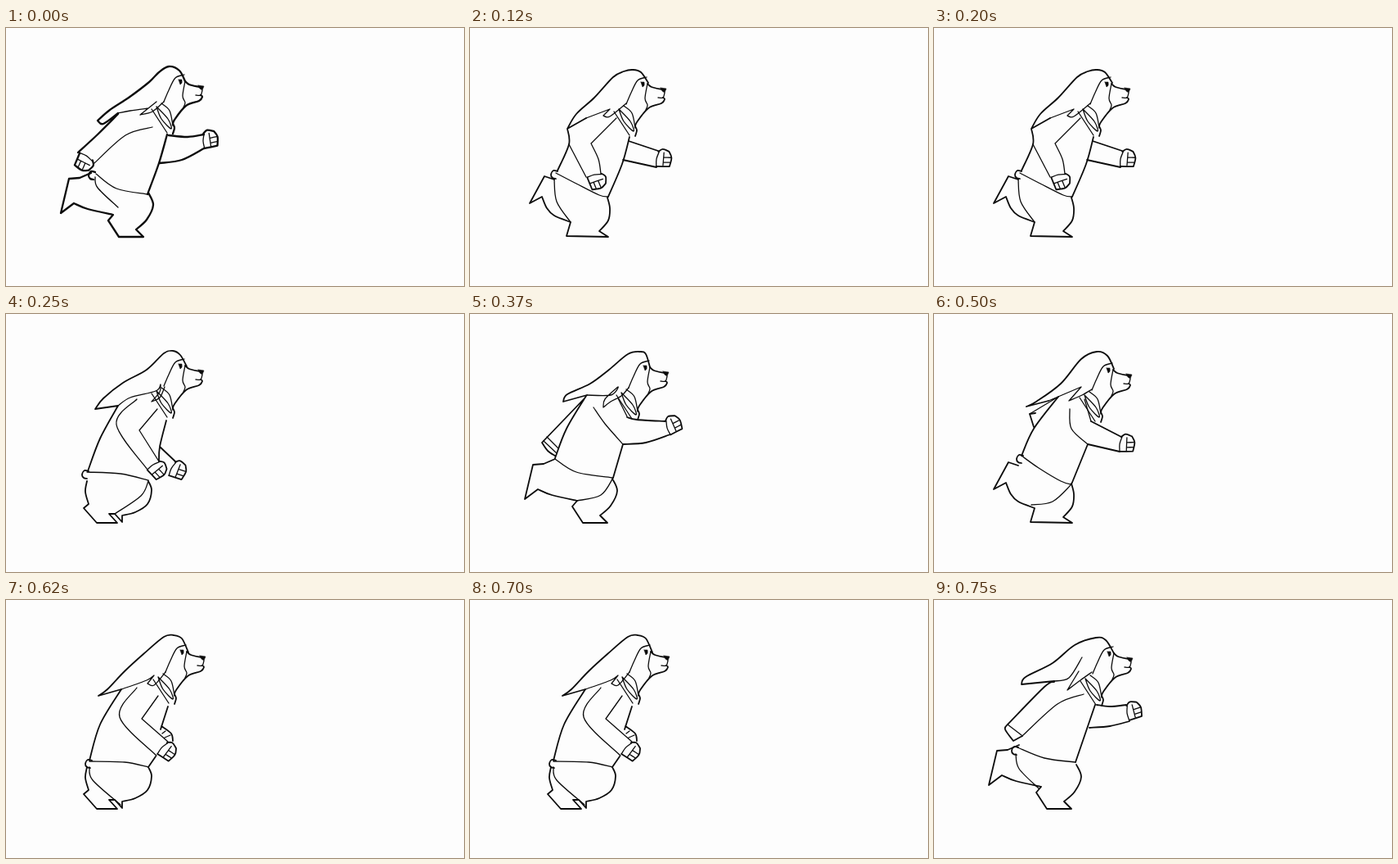
Recreate the animation shown at these times as an HTML page. Size 560 px wide and 315 px high, loop 0.87 s.

```html
<!DOCTYPE html>
<html lang="en">
<head>
<meta charset="utf-8">
<title>Running bear</title>
<style>
  html, body { margin: 0; width: 100%; height: 100%; overflow: hidden; background: #fdfdfd; }
  svg { display: block; width: 560px; height: 315px; }
  path { fill: none; stroke: #0c0c0c; stroke-linecap: round; stroke-linejoin: round; }
  .bold { stroke-width: 1.8; }
  .heavy .bold { stroke-width: 2.3; }
  .thin { stroke-width: 1.3; }
  .ink { fill: #0c0c0c; stroke-width: .6; }
</style>
</head>
<body>
<svg id="stage" viewBox="0 0 560 315"></svg>
<script>
// Strokes are separated by "/". Points are joined by a smooth curve; "!" marks a sharp corner.
const HEAD = {
  bold: '219,65 224,69 236,72 / 238,82! 240,84 236,89 220,95 206,112 204,118 / 204,117 206,122 204,129',
  thin: '240,76 238,82 232,82 / 219,65 216,83 219,91 217,97 / 218,57 207,61 199,76 193,90 / 190,92 200,101 204,119 / 184,96 198,111 202,123 190,111 184,96 / 178,99 197,128',
  ink: '235,70! 242,71! 240,76! 237,74! 235,70! / 211,63! 215,63! 215,67 213,69! 211,63!'
};

// Drawn pointing right, with the middle of the cuff at the origin.
const FIST = {
  bold: '0,-9! 5,-13 13,-11! 17,-4 16,7! 0,9',
  thin: '1,-9 -1,0 0,9 / 7,-9 8,7 / 8,-3 16,-4 / 8,3 16,2'
};

const TAIL = { bold: '4,-4 -1,-5 -4,0 -2,4 2,5' };

// The legs repeat every three steps: reach, land, gather.
const LEGS = [
  '104,177 90,183! 77,184! 67,226! 83,214! 100,221 131,228! 125,235! 138,255! 168,255! 159,246! 172,234 180,216 174,201',
  '103,185! 91,181! 73,214! 88,206! 94,220 103,229 123,237! 118,254! 169,255! 158,248! 169,235 171,220 168,207',
  '99,204 97,217 101,232! 95,237! 111,255! 136,255! 126,244! 133,244! 142,254! 142,246! 158,242 173,232 178,215 174,204'
];

const POSES = [
  { head: [0, 0], tail: [105, 180], fists: [[242, 138, -5], [98, 157, 120]],
    bold: '219,65 212,52 199,47 187,54 175,66 150,85 127,100 112,113! 119,117 137,104 / 137,105 112,130 88,152 / 197,130 187,165 173,203 / 199,131 222,133 242,130 / 188,165 215,161 242,147',
    thin: '137,104 152,101 174,98 / 184,90 164,106! 179,102 193,90 / 179,121 146,131 107,166 / 110,178 135,196 173,203 / 109,182 112,195 137,219' },
  { head: [-2, 3], tail: [103, 179], fists: [[229, 160, 8], [152, 180, 75]],
    bold: '218,67 209,54 199,51 188,53 175,60 152,85 130,105 119,123! 142,110 / 119,123 121,142 107,174 / 195,133 186,166 169,206 / 194,138 230,150 / 187,161 228,170',
    thin: '142,110 171,99! 163,107! 171,108 191,92 / 121,142 142,182 / 179,110 148,141! 157,160 160,178 / 105,177 130,190 158,204 169,206 / 103,185 106,212 123,237' },
  { head: [0, -2], tail: [97, 196], fists: [[203, 189, 25], [180, 185, 54]],
    bold: '221,64 213,50 204,45 193,48 172,68 143,84 119,103 109,116! 137,112 / 137,112 115,152 100,192 / 196,130 188,162 187,180 / 188,162 207,180',
    thin: '137,112 152,102 183,94 189,86! 188,95 178,107! 188,102 194,89 / 160,104 135,135 173,190 / 185,116 163,142! 187,180 / 99,193 140,195 174,203 / 174,204 165,222 133,244' },
  { head: [1, 0], fists: [[242, 139, -20]],
    bold: '220,65 215,49 208,46 193,49 170,68 147,85 119,98 114,107! 143,99 / 140,103 88,157! 95,167 104,173 / 142,100 118,140 104,176 / 187,159 175,200 / 192,126 204,129 239,131 / 187,159 215,157 245,147',
    thin: '143,99 172,99 181,89 165,104 163,114! 172,107 185,100 194,90 / 94,150 108,164 / 90,155 106,170 / 151,114 165,134 187,159 / 181,103 192,125 / 104,177 130,193 175,200 / 131,228 160,221 175,200' },
  { head: [0, 3], tail: [105, 177], fists: [[228, 159, 6]],
    bold: '220,67 212,51 199,46 180,55 155,85 125,107 113,113! 140,106 / 124,121 117,122! 122,138 / 152,101 122,140 107,173 / 188,159 168,208 / 192,131 229,150 / 188,159 227,168',
    thin: '140,106 180,89! 165,106! 181,99 193,92 / 117,122 152,101 / 166,116 168,140 188,159 / 184,104 192,131 / 107,173 128,188 155,204 168,208 / 119,233 145,229 168,208' },
  { head: [2, -2], tail: [101, 200], fists: [[191, 181, 40]],
    bold: '223,64 215,47 205,43 193,45 168,66 145,87 124,109 113,117! 141,109 / 141,109 115,152 102,196 / 198,130 189,158 / 183,191 174,204 / 190,154 202,163 204,172',
    thin: '141,109 172,98 181,92! 173,102! 181,104 195,88 / 160,107 139,143 184,190 / 186,117 166,145! 198,173 / 102,197 145,198 174,204 / 191,163 195,160 / 194,168 201,165 / 102,204 106,220 140,250' },
  { head: [1, 0], tail: [99, 184], fists: [[237, 138, -11]],
    bold: '220,65 210,49 198,46 172,55 145,77 112,94 107,103! 147,99 / 147,100 135,106 90,152! 87,158 97,172! 108,166 / 197,128 173,198 / 199,128 215,130 235,128 / 190,156 215,154 239,148',
    thin: '147,99 165,95 181,70 / 177,87 163,110! 179,98 193,88 / 183,115 151,127 108,166 / 90,152 107,165 / 102,180 135,193 173,198 / 100,188 104,206 128,230' }
];

// Catmull-Rom through the points, with tangents cut at corners.
function curve(stroke) {
  const pts = stroke.trim().split(/\s+/).map(s => {
    const [x, y] = s.replace('!', '').split(',').map(Number);
    return { x, y, corner: s.endsWith('!') };
  });
  let d = `M${pts[0].x} ${pts[0].y}`;
  for (let i = 1; i < pts.length; i++) {
    const a = pts[i - 1], b = pts[i];
    const p = a.corner ? a : pts[i - 2] || a;
    const n = b.corner ? b : pts[i + 1] || b;
    d += `C${a.x + (b.x - p.x) / 6} ${a.y + (b.y - p.y) / 6} ${b.x - (n.x - a.x) / 6} ${b.y - (n.y - a.y) / 6} ${b.x} ${b.y}`;
  }
  return d;
}

const trace = (cls, strokes) =>
  `<path class="${cls}" d="${strokes.split('/').map(curve).join('')}"/>`;

const place = (shape, [x, y, angle = 0]) =>
  `<g transform="translate(${x} ${y}) rotate(${angle})">` +
  Object.entries(shape).map(([cls, s]) => trace(cls, s)).join('') + '</g>';

const draw = (p, i) => `<g opacity="${i ? 0 : 1}" class="${i ? '' : 'heavy'}">` +
  trace('bold', `${p.bold} / ${LEGS[i % 3]}`) +
  trace('thin', p.thin) +
  p.fists.map(f => place(FIST, f)).join('') +
  (p.tail ? place(TAIL, p.tail) : '') +
  place(HEAD, p.head) + '</g>';

const stage = document.getElementById('stage');
stage.innerHTML = POSES.map(draw).join('');

// Each pose is held, then cut to the next; holds alternate 120 and 130 ms.
const startOf = i => i * 120 + Math.floor(i / 2) * 10;
const total = startOf(POSES.length);

POSES.forEach((_, i) => {
  const key = (ms, opacity) => ({ offset: ms / total, opacity, easing: 'step-end' });
  const keys = [key(startOf(i), 1), key(startOf(i + 1), 0)];
  if (i > 0) keys.unshift(key(0, 0));
  if (i < POSES.length - 1) keys.push(key(total, 0));
  stage.children[i].animate(keys, { duration: total, iterations: Infinity });
});
</script>
</body>
</html>
```
